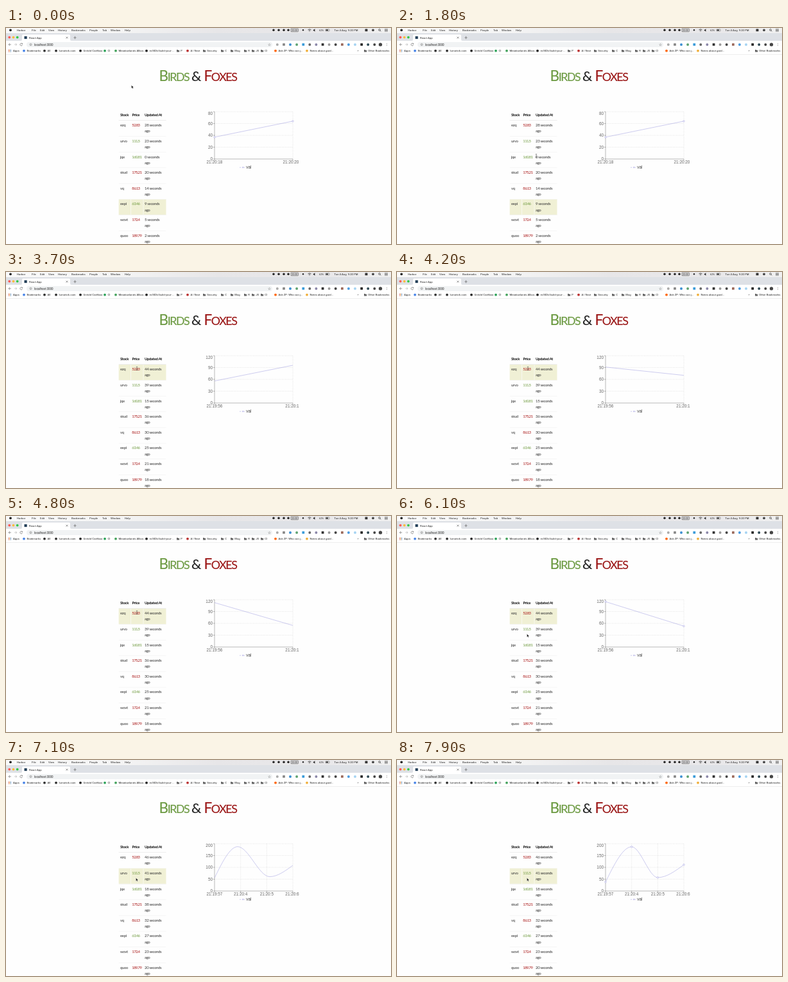
Animation, 600 px wide and 338 px high, one loop 8 s. Source, as an HTML page:

```html
<!DOCTYPE html>
<html lang="en">
<head>
<meta charset="utf-8">
<title>Stock board</title>
<style>
  html, body { margin: 0; width: 100%; height: 100%; overflow: hidden; background: #fefefe; }
  svg { display: block; width: 600px; height: 338px; }
  text { white-space: pre; }
  .ui { font: 4.3px Roboto, sans-serif; fill: #222; }
  .cell { font: 6px Lato, sans-serif; letter-spacing: -.35px; fill: #333; }
  .price { letter-spacing: -.65px; }
  .head { font-weight: 700; fill: #111; }
  .title { font: 17.8px Lato, sans-serif; letter-spacing: -1.4px; stroke-width: .15; }
  .title .cap { font-size: 22.5px; }
  .axis { font: 6.4px "Liberation Sans", Arial, sans-serif; fill: #666; }
  .grid { stroke: #ccc; stroke-width: .42; stroke-dasharray: 1.25 1.25; }
  .rule { stroke: #666; stroke-width: .45; }
  .val { stroke: #8884d8; stroke-width: .42; fill: none; }
  .dot { stroke: #8884d8; stroke-width: .42; fill: #fff; }
</style>
</head>
<body>
<svg id="stage" viewBox="0 0 600 338" xmlns="http://www.w3.org/2000/svg">
  <defs>
    <linearGradient id="glass">
      <stop offset="0" stop-color="#fafafa"/>
      <stop offset=".3" stop-color="#f4f4f4"/>
      <stop offset=".55" stop-color="#e7e6e8"/>
      <stop offset=".85" stop-color="#e9e8ea"/>
      <stop offset="1" stop-color="#f1f1f1"/>
    </linearGradient>
  </defs>
  <g id="browser"></g>
  <g id="page"></g>
  <g id="table"></g>
  <g id="axes"></g>
  <path id="line" class="val"/>
  <g id="dots"></g>
  <g id="arrow"><path d="M0 0V4.9L1.1 3.9 1.9 5.6 2.8 5.2 2 3.6H3.5Z" fill="#111" stroke="#fff" stroke-width=".35"/></g>
  <g id="beam"><path d="M-1.2-2.8Q0-2.8 0-2V2Q0 2.8-1.2 2.8M1.2-2.8Q0-2.8 0-2M0 2Q0 2.8 1.2 2.8" fill="none" stroke="#333" stroke-width=".5"/></g>
</svg>
<script>
const LOOP = 8000, DRAW = 1500;
const $ = id => document.getElementById(id);

const rect = (x, y, w, h, fill, extra = '') =>
  `<rect x="${x}" y="${y}" width="${w}" height="${h}" fill="${fill}" ${extra}/>`;
const circle = (x, y, r, fill, extra = '') =>
  `<circle cx="${x}" cy="${y}" r="${r}" fill="${fill}" ${extra}/>`;
const text = (x, y, str, cls, extra = '') =>
  `<text x="${x}" y="${y}" class="${cls}" ${extra}>${str.replace('&', '&amp;')}</text>`;
const seg = (x1, y1, x2, y2, cls) =>
  `<line x1="${x1}" y1="${y1}" x2="${x2}" y2="${y2}" class="${cls}"/>`;
const stroke = (d, color = '#555', w = .6) =>
  `<path d="${d}" fill="none" stroke="${color}" stroke-width="${w}"/>`;
const folder = (x, y) =>
  `<path d="M${x - 2} ${y - 1.6}h1.6l.6.6h2v2.8h-4.2z" fill="#666"/>`;

function menuBar() {
  const items = [[40, 'File'], [53, 'Edit'], [66, 'View'], [81, 'History'], [102, 'Bookmarks'],
    [130, 'People'], [150, 'Tab'], [163, 'Window'], [185, 'Help']];
  const icons = [417, 425, 433, 440, 463];
  return rect(0, 0, 600, 8, 'url(#glass)') + circle(7, 3.3, 1.9, '#222') +
    text(17, 4.9, 'Harbor', 'ui', 'font-weight="700"') +
    items.map(([x, s]) => text(x, 4.9, s, 'ui')).join('') +
    icons.map((x, i) => circle(x, 3.3, i === 4 ? 1.2 : 1.7, '#222')).join('') +
    rect(444, 1, 11.5, 4.8, 'none', 'stroke="#333" stroke-width=".5" rx=".8"') +
    text(445, 4.8, '20:00', 'ui', 'style="font-size:3.8px"') +
    stroke('M470.5 2.8Q473 .8 475.5 2.8M471.7 4Q473 2.9 474.3 4', '#222', .7) + circle(473, 5, .5, '#222') +
    `<path d="M478.8 2.7h1l1.6-1.4v4.4l-1.6-1.4h-1z" fill="#222"/>` +
    text(488, 4.8, '62%', 'ui', 'style="font-size:3.8px"') +
    rect(498, 1.9, 6, 3, 'none', 'stroke="#333" stroke-width=".4" rx=".6"') + rect(498.6, 2.5, 3.3, 1.8, '#222') +
    text(511.5, 4.9, 'Tue 4 Aug  9:20 PM', 'ui') +
    rect(559.5, 1.4, 4, 3.8, '#333', 'rx=".5"') + circle(572, 3.3, 1.9, '#444') +
    circle(582, 3, 1.4, 'none', 'stroke="#222" stroke-width=".6"') + stroke('M583 4l1.4 1.4', '#222') +
    stroke('M590 1.9h5M590 3.5h5M590 5.1h5', '#222', .6);
}

function tabsAndToolbar() {
  const lights = ['#fc5b57', '#fdbc40', '#34c84a'];
  const tools = ['#aaa', '#888', '#3d8fd1', '#5da271', '#3a9bd9', '#666', '#8a86a8', '#333',
    '#999', '#444', '#9b6a5c', '#4b9be0', '#a5d3f2', '#222', '#2f4a55', '#444'];
  return rect(0, 8, 600, 12, '#dee1e6') +
    lights.map((c, i) => circle(5.3 + 6.2 * i, 14.6, 1.9, c)).join('') +
    `<path d="M23 20Q25 20 25 18V12Q25 10.3 27 10.3H98Q100 10.3 100 12V18Q100 20 102 20Z" fill="#fff"/>` +
    rect(28.5, 12.9, 4.2, 4.2, '#24405a') + text(36, 16.7, 'React App', 'ui') +
    stroke('M93.5 13.7l2.8 2.8m0-2.8l-2.8 2.8M105.3 15.1h4.4m-2.2-2.2v4.4') +
    rect(0, 20, 600, 21.5, '#fff') +
    stroke('M8 25.9H4.2m1.8-1.8l-1.8 1.8 1.8 1.8') +
    stroke('M13 25.9h3.8m-1.8-1.8l1.8 1.8-1.8 1.8', '#aaa') +
    stroke('M25.3 24.7A1.9 1.9 0 1 0 25.6 26.5M25.6 23.7v1.3h-1.3') +
    rect(32, 22, 383, 8, '#f1f3f4', 'rx="4"') +
    circle(38.5, 25.9, 1.6, 'none', 'stroke="#666" stroke-width=".5"') + stroke('M38.5 25.5v1.4', '#666', .5) +
    text(44, 27.5, 'localhost:3000', 'ui', 'style="font-size:4.5px"') +
    text(408, 27.8, '☆', 'ui', 'style="font-size:5.5px"') +
    tools.map((c, i) => i % 3 === 1
      ? rect(421 + 10.1 * i, 24, 3.8, 3.8, c, 'rx=".6"')
      : circle(422.8 + 10.1 * i, 25.9, 2, c)).join('') +
    circle(583.5, 25.9, 2.7, '#444') +
    [24.3, 25.9, 27.5].map(y => circle(593.5, y, .45, '#555')).join('');
}

function bookmarks() {
  const links = [[28, 'Bookmarks', '#4a86e8'], [60, 'AE', '#333'], [78, 'lumotick.com', '#333'],
    [116, 'Unfold Craftbox', '#222'], [154, 'CI', '#2fa35a'], [171, 'Meadowlands Allian...', '#46a35e'],
    [219, 'm382k/build-your-...', '#222'], [283, 'A | Next', '#b33'],
    [420, 'Ask ZP: Who can j...', '#f60'], [469, 'Notes about gard...', '#f0b03c']];
  const folders = [[268, 'P'], [309, 'Security'], [337, 'C'], [352, 'Blog'], [373, 'R'],
    [385, 'JS'], [399, 'CI'], [560, 'Other Bookmarks']];
  let grid = '';
  for (let i = 0; i < 9; i++)
    grid += rect(4 + 1.5 * (i % 3), 33.6 + 1.5 * Math.floor(i / 3), 1, 1, ['#d84c3e', '#e2a53a', '#4a8ae0'][i % 3]);
  return grid + text(11, 37.3, 'Apps', 'ui') +
    links.map(([x, s, c]) => circle(x, 35.7, 1.9, c) + text(x + 4.5, 37.3, s, 'ui')).join('') +
    folders.map(([x, s]) => folder(x, 35.7) + text(x + 4.2, 37.3, s, 'ui')).join('') +
    text(547.5, 37.3, '»', 'ui') + rect(0, 41, 600, .5, '#dcdcdc');
}

const word = (x, str, color) =>
  `<text x="${x}" y="82.8" class="title" fill="${color}" stroke="${color}"><tspan class="cap">${str[0]}</tspan>${str.slice(1).toUpperCase()}</text>`;

$('browser').innerHTML = menuBar() + tabsAndToolbar() + bookmarks();
$('page').innerHTML = word(238.5, 'Birds', '#6c9a42') +
  text(289, 82.8, '&', 'title', 'style="font-size:21.5px" fill="#222" stroke="#222"') +
  word(308.5, 'Foxes', '#9b1717') +
  stroke('M364 218.2h2.2m2.2 0h3.6', '#8884d8', .42) +
  circle(369.2, 218.2, .8, '#fff', 'stroke="#8884d8" stroke-width=".4"') +
  text(374.3, 220.4, 'val', 'axis', 'style="fill:#444"');

const GREEN = '#6f9a3f', RED = '#a81414';
const stocks = [['ezq', '52.83', RED], ['urvo', '111.5', GREEN], ['jqe', '160.81', GREEN], ['skud', '175.21', RED],
  ['vq', '86.13', RED], ['eepi', '63.46', GREEN], ['wovt', '172.4', RED], ['quoo', '189.79', RED]];

const LEFT = 325, RIGHT = 447, TOP = 131, BOTTOM = 205;
const views = [
  { at: -DRAW, row: 5, ages: [28, 23, 0, 20, 14, 9, 5, 2], max: 80, vals: [37, 64],
    times: ['21:20:18', '21:20:20'], endX: 444 },
  { at: 3680, row: 0, ages: [44, 39, 15, 36, 30, 25, 21, 18], max: 120, vals: [115, 53],
    times: ['21:19:56', '21:20:1'], endX: 446 },
  { at: 6200, row: 1, ages: [46, 41, 18, 38, 32, 27, 23, 20], max: 200, vals: [38, 187, 57, 111],
    times: ['21:19:57', '21:20:4', '21:20:5', '21:20:6'], endX: 446 }
];
for (const v of views) {
  const n = v.vals.length - 1;
  v.pts = v.vals.map((val, i) => [LEFT + (RIGHT - LEFT) * i / n, BOTTOM - (BOTTOM - TOP) * val / v.max]);
}

function tableMarkup(view) {
  const pitch = 24.65, top = 145;
  let out = text(178, 138.4, 'Stock', 'cell head') + text(196.5, 138.4, 'Price', 'cell head') +
    text(216, 138.4, 'Updated At', 'cell head') + rect(175.7, 144.3, 73.8, .6, '#e2e2e2');
  stocks.forEach(([name, price, color], i) => {
    const y = top + pitch * i;
    if (i === view.row)
      out += rect(175.7, y, 18.5, pitch - .5, '#f0f0d5') + rect(194.8, y, 18.9, pitch - .5, '#f0f0d5') +
        rect(214.3, y, 35.2, pitch - .5, '#f0f0d5');
    out += rect(175.7, y + pitch - .4, 73.8, .4, '#e8e8e8') +
      text(178, y + 9.2, name, 'cell') +
      text(196.3, y + 9.2, price, 'cell price', `style="fill:${color}"`) +
      text(216, y + 9.2, view.ages[i] + ' seconds', 'cell') +
      text(216, y + 18.4, 'ago', 'cell');
  });
  return out;
}

function axesMarkup(view) {
  let out = '';
  for (let i = 0; i <= 4; i++) {
    const y = BOTTOM - (BOTTOM - TOP) * i / 4;
    if (i) out += seg(LEFT, y, RIGHT, y, 'grid');
    out += seg(LEFT - 2.2, y, LEFT, y, 'rule') +
      text(322, y + (i === 4 ? 4.5 : 2.3), String(view.max * i / 4), 'axis', 'text-anchor="end"');
  }
  view.pts.forEach(([x], i) => {
    const last = i === view.pts.length - 1;
    if (i) out += seg(x, TOP, x, BOTTOM, 'grid');
    out += seg(x, BOTTOM, x, BOTTOM + 2.2, 'rule') +
      text(last ? view.endX : x, 212.2, view.times[i], 'axis', 'text-anchor="middle"');
  });
  return out + seg(LEFT, TOP, LEFT, BOTTOM, 'rule') + seg(LEFT, BOTTOM, RIGHT, BOTTOM, 'rule');
}

// cubic-bezier(.25, .1, .25, 1)
function ease(x) {
  if (x <= 0 || x >= 1) return Math.min(1, Math.max(0, x));
  let lo = 0, hi = 1, s;
  for (let i = 0; i < 24; i++) {
    s = (lo + hi) / 2;
    if (.75 * s * (1 - s) + s ** 3 < x) lo = s; else hi = s;
  }
  return .3 * s * (1 - s) ** 2 + 3 * s * s * (1 - s) + s ** 3;
}

const mix = (a, b, p) => a + (b - a) * p;

// New points grow out of the nearest earlier ones.
function morph(from, to, p) {
  return to.map(([x, y], i) => {
    const [fx, fy] = from[Math.floor(i * from.length / to.length)];
    return [mix(fx, x, p), mix(fy, y, p)];
  });
}

function monotonePath(pts) {
  const n = pts.length - 1, h = [], s = [], m = [];
  for (let i = 0; i < n; i++) {
    h[i] = pts[i + 1][0] - pts[i][0] || 1e-6;
    s[i] = (pts[i + 1][1] - pts[i][1]) / h[i];
  }
  if (n === 1) m.push(s[0], s[0]);
  else {
    for (let i = 1; i < n; i++) {
      const p = (s[i - 1] * h[i] + s[i] * h[i - 1]) / (h[i - 1] + h[i]);
      m[i] = (Math.sign(s[i - 1]) + Math.sign(s[i])) *
        Math.min(Math.abs(s[i - 1]), Math.abs(s[i]), Math.abs(p) / 2);
    }
    m[0] = (3 * s[0] - m[1]) / 2;
    m[n] = (3 * s[n - 1] - m[n - 1]) / 2;
  }
  let d = `M${pts[0]}`;
  for (let i = 0; i < n; i++) {
    const [x0, y0] = pts[i], [x1, y1] = pts[i + 1], dx = h[i] / 3;
    d += `C${x0 + dx} ${y0 + dx * m[i]} ${x1 - dx} ${y1 - dx * m[i + 1]} ${x1} ${y1}`;
  }
  return d;
}

// time, x, y, over text
const moves = [[0, 195.5, 89.5, 0], [900, 195.5, 89.5, 0], [1700, 217, 200, 1], [2600, 217, 200, 0],
  [3450, 204, 151, 1], [5300, 204, 151, 0], [5900, 202.5, 184.5, 0], [LOOP, 202.5, 184.5, 0]];

function drawCursor(t) {
  const i = moves.findIndex((k, n) => n === moves.length - 1 || t < moves[n + 1][0]);
  const a = moves[i], b = moves[Math.min(i + 1, moves.length - 1)];
  const q = (t - a[0]) / (b[0] - a[0] || 1), p = q * q * (3 - 2 * q);
  const place = `translate(${mix(a[1], b[1], p)} ${mix(a[2], b[2], p)})`;
  for (const [id, on] of [['arrow', !a[3]], ['beam', a[3]]]) {
    $(id).setAttribute('transform', place);
    $(id).style.display = on ? '' : 'none';
  }
}

let shown = -1;
function draw(now) {
  const t = now % LOOP;
  const n = views.filter(v => t >= v.at).length - 1, view = views[n];
  if (n !== shown) {
    $('table').innerHTML = tableMarkup(view);
    $('axes').innerHTML = axesMarkup(view);
    $('dots').innerHTML = view.pts.map(([x, y]) => `<circle cx="${x}" cy="${y}" r="1.25" class="dot"/>`).join('');
    shown = n;
  }
  const q = (t - view.at) / DRAW;
  const from = views[Math.max(0, n - 1)].pts;
  $('line').setAttribute('d', monotonePath(morph(from, view.pts, ease(q))));
  $('dots').style.display = q >= 1 ? '' : 'none';
  drawCursor(t);
}

const start = performance.now();
function tick() {
  draw(performance.now() - start);
  requestAnimationFrame(tick);
}
tick();
</script>
</body>
</html>
```
